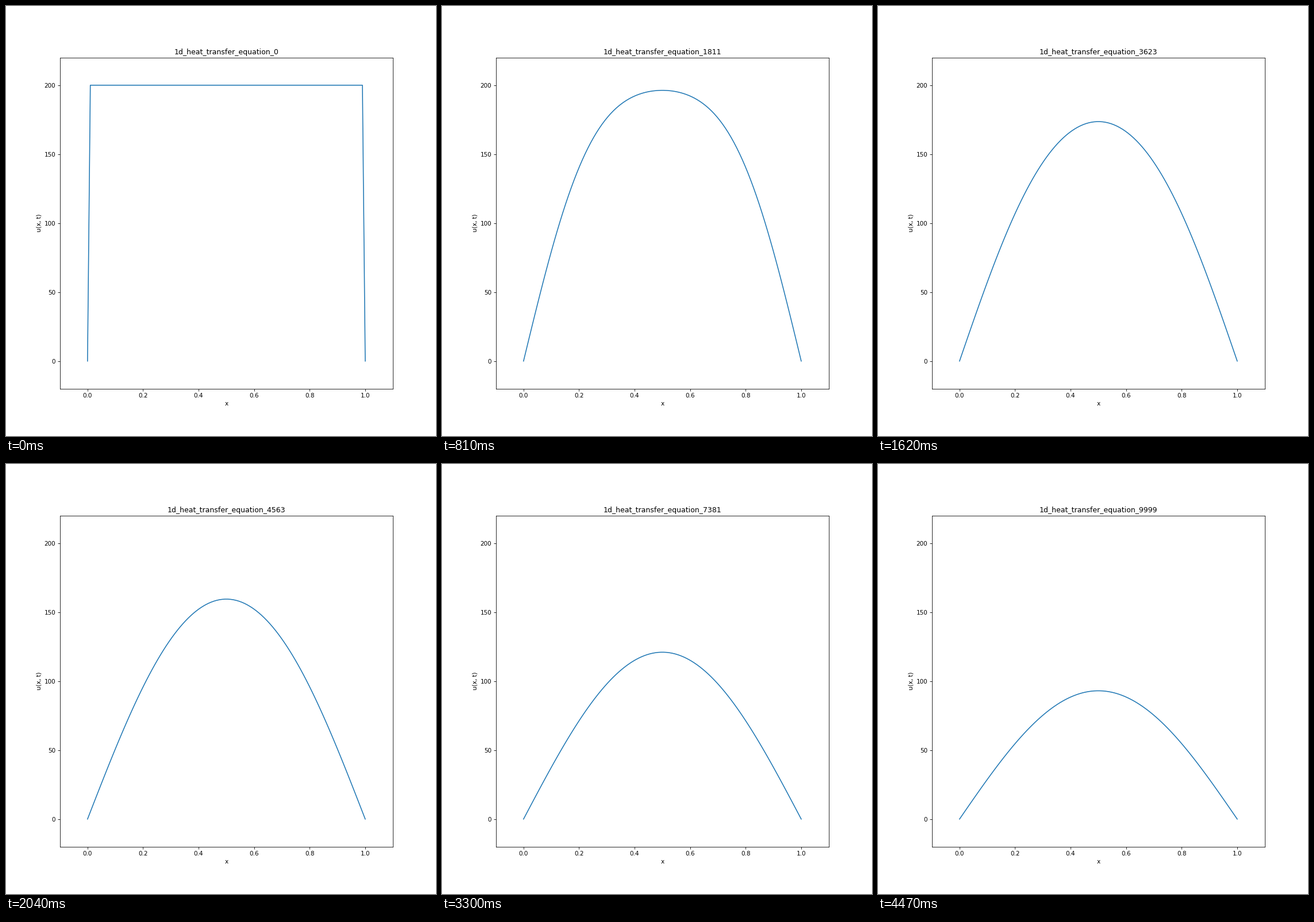
A matplotlib script for the animation above (4.5 s loop, 748 by 748 pixels).

```python
import numpy as np
import matplotlib.pyplot as plt
from matplotlib.animation import FuncAnimation

FRAMES = 150
INTERVAL = 30      # ms
LAST_STEP = 9999
POINTS = 100
RATIO = 0.1        # diffusivity * dt / dx**2


def solve(steps):
    """Explicit heat equation with cold ends; returns the profile at each step."""
    u = np.full(POINTS, 200.0)
    u[0] = u[-1] = 0
    profiles = [u.copy()]
    for _ in range(steps):
        u[1:-1] += RATIO * (u[2:] - 2 * u[1:-1] + u[:-2])
        profiles.append(u.copy())
    return profiles


profiles = solve(LAST_STEP)
x = np.linspace(0, 1, POINTS)

fig, ax = plt.subplots(figsize=(10, 10), dpi=74.8)
line, = ax.plot(x, profiles[0])
ax.set(xlim=(-0.1, 1.1), ylim=(-20, 220), xlabel="x", ylabel="u(x, t)")
ax.set_xticks(np.linspace(0, 1, 6))
ax.set_yticks(range(0, 201, 50))
title = ax.set_title("")


def draw(frame):
    step = frame * LAST_STEP // (FRAMES - 1)
    line.set_ydata(profiles[step])
    title.set_text(f"1d_heat_transfer_equation_{step}")
    return line, title


anim = FuncAnimation(fig, draw, frames=FRAMES, interval=INTERVAL,
                     repeat=True, repeat_delay=0, blit=False)
plt.show()
```
